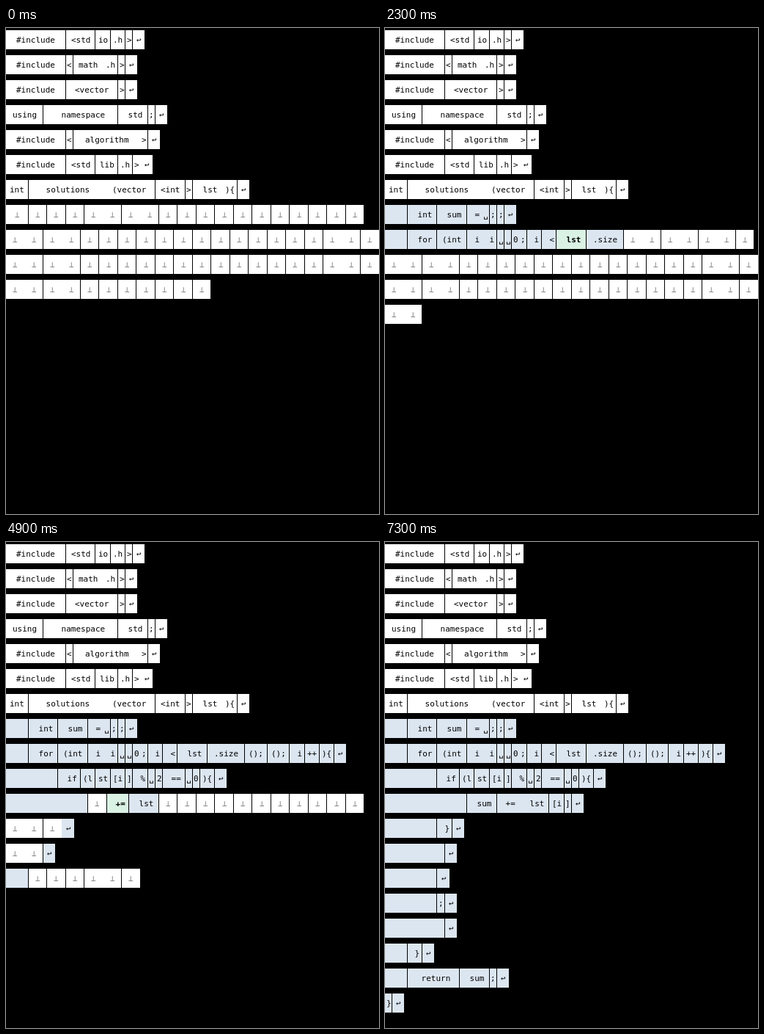
Write an HTML page that moves like this. It is 509 by 662 pixels and loops after 7900 ms.

```html
<!DOCTYPE html>
<html lang="en">
<head>
<meta charset="utf-8">
<title>Masked code generation</title>
<style>
  html, body { margin: 0; width: 100%; height: 100%; overflow: hidden; background: #000; }
  svg { display: block; width: 509px; height: 662px; }
  rect { shape-rendering: crispEdges; }
  text { font: 11px "DejaVu Sans Mono", monospace; white-space: pre; }
  .latest { font-weight: bold; }
</style>
</head>
<body>
<svg id="stage" viewBox="0 0 509 662"></svg>
<script>
const NS = 'http://www.w3.org/2000/svg';
const stage = document.getElementById('stage');

const LOOP = 7900, HOLD = 300, STEP = 100;
const UNIT = 10.188, GAP = 0.865, COLUMNS = 50;
const TOP = 3, PITCH = 34, HEIGHT = 26, BASELINE = 17;
const ADVANCE = 11 * 0.60205;
const MASK = '⊥', BREAK = '↩', SPACE = '␣';
const BLUE = '#dce6f1', GREEN = '#daf2e4';

// One string per line, tokens separated by a bar.
const split = lines => lines.flatMap(line => [...line.split('|'), BREAK]);
const indent = n => ' '.repeat(n);

const prompt = split([
  '#include|<std|io|.h|>',
  '#include|<|math|.h|>',
  '#include|<vector|>',
  'using| namespace| std|;',
  '#include|<|algorithm|>',
  '#include|<std|lib|.h|>',
  'int| solutions|(vector|<int|>| lst|){'
]);

const answer = split([
  indent(3) + `| int| sum| =|${SPACE}|;|;`,
  indent(3) + `| for|(int| i| i|${SPACE}|${SPACE}|0|;| i| <| lst|.size|();|();| i|++|){`,
  indent(7) + `| if|(l|st|[i|]| %|${SPACE}|2| ==|${SPACE}|0|){`,
  indent(11) + '| sum| +=| lst|[i|]',
  indent(7) + '| }',
  indent(8),
  indent(7),
  indent(7) + '|;',
  indent(8),
  indent(3) + '| }',
  indent(3) + '| return| sum|;',
  '}'
]);

// Order in which the masked tokens are filled in.
const run = (a, b) => Array.from({ length: b - a + 1 }, (_, i) => a + i);
const order = [
  ...run(0, 3), 7, 6, 4, 5,
  ...run(8, 18), 20, 19,
  ...run(21, 41), 62, 63, 59, 44, 43,
  57, 42, 45, 47, 46, 50, 60, 61, 58, 48, 49, 52,
  51, 54, 55, 53, 56,
  64, 67, 66, 65, 69, 68
];
const rank = [];
order.forEach((token, i) => { rank[token] = i + 1; });

function add(parent, tag, attrs, content) {
  const el = document.createElementNS(NS, tag);
  for (const key in attrs) el.setAttribute(key, attrs[key]);
  if (content) el.textContent = content;
  parent.appendChild(el);
}

function cells(step) {
  const given = prompt.map(text => ({ text, fill: '#fff' }));
  const filled = answer.map((text, i) => {
    if (rank[i] > step) return { text: MASK, fill: '#fff', width: i ? 2.5 : 3 };
    const latest = rank[i] === step;
    return { text, fill: latest ? GREEN : BLUE, latest };
  });
  return given.concat(filled);
}

function drawCell(parent, cell, col, width, row) {
  const x = col * UNIT, end = x + width * UNIT;
  const left = Math.round(x), right = Math.round(end - GAP);
  const y = TOP + row * PITCH;
  add(parent, 'rect', { x: left, y, width: right - left, height: HEIGHT, fill: cell.fill });

  const word = cell.text.trim();
  if (!word) return;
  const lead = cell.text.length - word.length;
  const start = Math.round((x + end - cell.text.length * ADVANCE) / 2);
  add(parent, 'text', {
    x: start + lead * ADVANCE,
    y: y + BASELINE,
    fill: word === MASK ? '#808080' : '#000',
    class: cell.latest ? 'latest' : ''
  }, word);
}

function draw(step) {
  const page = document.createDocumentFragment();
  let col = 0, row = 0;
  for (const cell of cells(step)) {
    const isBreak = cell.text === BREAK;
    const width = cell.width || (isBreak ? 1.675 : cell.text.length);
    if (col + width > COLUMNS) { col = 0; row++; }
    drawCell(page, cell, col, width, row);
    col += width;
    if (isBreak) { col = 0; row++; }
  }
  stage.replaceChildren(page);
}

const origin = performance.now();
let shown = -1;

function tick() {
  const t = (performance.now() - origin) % LOOP;
  const step = t < HOLD ? 0 : Math.min(order.length + 1, Math.floor((t - HOLD) / STEP) + 1);
  if (step !== shown) draw(shown = step);
  requestAnimationFrame(tick);
}
tick();
</script>
</body>
</html>
```
